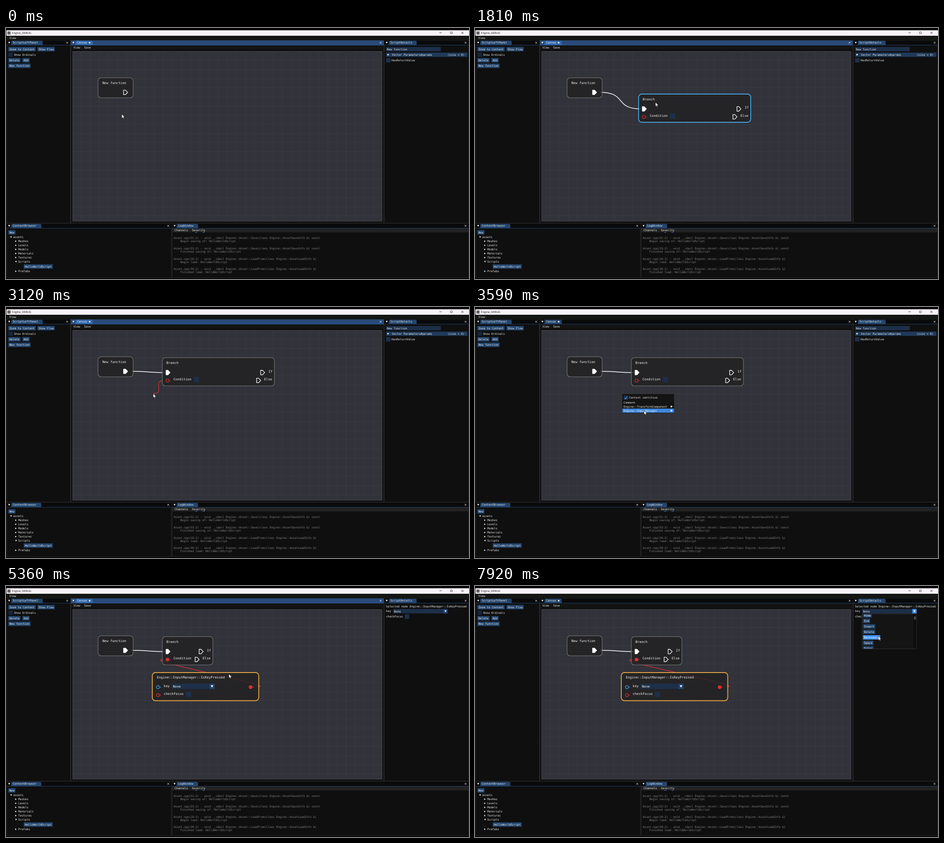
Animation of 1016x551 px, one loop 8 s. Source, as an HTML page:

```html
<!DOCTYPE html>
<html lang="en">
<head>
<meta charset="utf-8">
<title>Engine_DEBUG</title>
<style>
html, body { margin: 0; width: 100%; height: 100%; overflow: hidden; background: #000; }
svg { display: block; width: 100vw; height: 100vh; }
text { font-family: "DejaVu Sans Mono", "Liberation Mono", monospace; text-rendering: geometricPrecision; white-space: pre; }
.ui { font-family: "Open Sans", "Noto Sans", sans-serif; }
.bar { fill: #0a0a0a; }
.tab { fill: #23456d; }
.focus .bar { fill: #294a7a; }
.focus .tab { fill: #3368ad; }
</style>
</head>
<body>
<svg id="stage" viewBox="0 0 1016 551" xmlns="http://www.w3.org/2000/svg"></svg>
<script>
const LOOP = 8000;
const UI = 6.146, NODE = 7.29;            // font sizes: panels, graph nodes
const BTN = '#23456d', FRAME = '#1d2f49', HOT = '#4296fa', ROW = '#3d87e0';
const RED = '#dc3030', BLUE = '#45a3de', ORANGE = '#dfa043', GREY = '#7c7c7e';

// ---- drawing helpers (return SVG markup) ----
const rect = (x, y, w, h, fill, more = '') =>
  `<rect x="${x}" y="${y}" width="${w}" height="${h}" ${fill && `fill="${fill}"`} ${more}/>`;
const text = (x, mid, s, fill = '#f2f2f2', size = UI, more = '') =>
  `<text x="${x}" y="${mid + size * 0.35}" font-size="${size}" fill="${fill}" ${more}>${s.replace(/&/g, '&amp;')}</text>`;
const path = (d, fill, stroke = 'none', w = 1, more = '') =>
  `<path d="${d}" ${fill && `fill="${fill}"`} stroke="${stroke}" stroke-width="${w}" ${more}/>`;
const group = (id, inner, more = '') => `<g id="${id}" ${more}>${inner}</g>`;
const down = (x, y, r = 2.2) => path(`M${x - r},${y - r * .8}h${2 * r}l${-r},${r * 1.7}z`, '#fff');
const right = (x, y, r = 2) => path(`M${x - r * .8},${y - r}v${2 * r}l${r * 1.8},${-r}z`, '#fff');
const cross = (x, y, c = '#eee', r = 1.9) =>
  path(`M${x - r},${y - r}l${2 * r},${2 * r}m0,${-2 * r}l${-2 * r},${2 * r}`, 'none', c, .9);
const button = (x, y, s) =>
  rect(x, y, s.length * 3.7 + 4.6, 9.6, BTN) + text(x + 2.4, y + 4.9, s);
const flow = (x, y, id, fill = 'none') =>
  path(`M${x},${y - 4.9}h4.2l4.7,4.9l-4.7,4.9h-4.2z`, fill, '#fff', 1.3, `id="${id}" stroke-linejoin="round"`);
const pin = (x, y, c, id = '') =>
  `<circle ${id && `id="${id}"`} cx="${x}" cy="${y}" r="3.3" fill="none" stroke="${c}" stroke-width="1.3"/>` +
  path(`M${x + 4.8},${y - 1.6}v3.2l2.2,-1.6z`, c);
const nodeBox = (id, w, h) =>
  rect(0, 0, w, h, 'rgba(32,32,32,.78)', `id="${id}" rx="7" stroke="${GREY}" stroke-width="1.1"`);

const panel = (x, y, w, h, name, tabW) => group('win' + name,
  rect(x, y, w, h, '#0f0f0f', 'stroke="#37373c" stroke-width=".8"') +
  rect(x, y, w, 10, '', 'class="bar"') + rect(x, y + 9.7, w, .9, '', 'class="tab"') +
  path(`M${x + 10},${y + 10}v-7q0,-2.4 2.4,-2.4h${tabW - 4.8}q2.4,0 2.4,2.4v7z`, '', 'none', 0, 'class="tab"') +
  down(x + 5.5, y + 4.9) + text(x + 13.5, y + 5, name) + cross(x + w - 7, y + 5));

function grid() {
  let d = '';
  for (let x = 164.5; x < 825; x += 20.07) d += `M${x},51.5V424`;
  for (let y = 71; y < 424; y += 20.07) d += `M146.5,${y}H825`;
  return rect(146.5, 51.5, 678.5, 372.5, '#32323a', 'stroke="#4c4c54" stroke-width="1"') + path(d, 'none', '#3d3d44', .8);
}

function tree() {
  const names = ['Meshes', 'Levels', 'Models', 'Materials', 'Textures', 'Scripts'];
  return down(11.2, 459, 1.9) + text(16, 459, 'assets') +
    names.map((n, i) => {
      const y = 468 + 9 * i;
      return (n === 'Scripts' ? down(22, y, 1.9) : right(21.6, y, 1.8)) + text(27, y, n);
    }).join('') +
    button(38.8, 518.8, 'HelloWorldScript') + right(21.6, 534, 1.8) + text(27, 534, 'Prefabs');
}

function log() {
  const save = 'Save(class Engine::AssetSaveInfo &) const', load = 'LoadFrom(class Engine::AssetLoadInfo &)';
  return [['51:2', save, 'Begin saving of'], ['53:2', save, 'Finished saving of'],
          ['19:2', load, 'Begin load'], ['39:2', load, 'Finished load']].map(([at, fn, msg], i) => {
    const y = 461 + 22.7 * i;
    return text(368, y, `Asset.cpp(${at}) - void __cdecl Engine::Asset::${fn}`, '#858585') +
      text(382.6, y + 7, `${msg}: HelloWorldScript`, '#858585');
  }).join('');
}

const windowFrame =
  rect(1, 5, 1015, 12, '#faf3fa') + rect(3, 7.5, 7, 7, '#666') +
  text(13, 11, 'Engine_DEBUG', '#111', 6.1, 'class="ui"') +
  path('M951,10.5h5', 'none', '#222', .8) +
  rect(975.3, 8.6, 4, 4, 'none', 'stroke="#222" stroke-width=".8" rx=".6"') + cross(1001.6, 10.6, '#222', 2.3) +
  rect(1, 17, 1015, 10, '#141614') + text(7.5, 22, 'View');

const leftPanel = panel(1.5, 27.3, 139.8, 401, 'ScriptLeftPanel', 69) +
  button(5, 41.6, 'Zoom to Content') + button(69, 41.6, 'Show Flow') +
  rect(5.2, 53.6, 9.8, 9.8, '#16263c') + text(17.4, 58.7, 'Show Ordinals') +
  button(5, 66, 'Delete') + button(36, 66, 'Add') + button(5, 78.2, 'New function');

const canvas = panel(142.4, 27.3, 686.6, 401, 'Canvas', 38) +
  '<circle cx="183.6" cy="32.2" r="1.7" fill="#fff"/>' +
  rect(142.8, 38, 686, 9.4, '#141414') + text(148, 42.4, 'View') + text(171.5, 42.4, 'Save') + grid();

const browser = panel(1.5, 429.3, 361.5, 119, 'ContentBrowser', 66) + button(5, 443.8, 'New') + tree();
const logPanel = panel(364.4, 429.3, 651, 119, 'LogWindow', 47) +
  rect(364.8, 440, 650.4, 8.6, '#222') + text(370, 444.3, 'Channels') + text(408, 444.3, 'Severity') +
  path('M415,448.7h5M431,448.7h5', 'none', '#3d78c4', 1) + log();

const combo = (x, y, w, h, id) =>
  rect(x, y, w, h, FRAME) + rect(x + w - h + .5, y, h - .5, h, BTN, `id="${id}"`) + down(x + w - h / 2 + .3, y + h / 2, 2.4);

const details = panel(830, 27.3, 185.5, 401, 'ScriptDetails', 61) +
  group('fnInfo', rect(834, 41.6, 120, 9.6, FRAME) + text(836, 46.5, 'New function') +
    rect(834, 54, 178.5, 9.4, '#1f3958') + right(838.8, 58.6, 2.2) +
    text(846.8, 58.7, 'Vector Paramaters#params') + text(969, 58.7, '(size = 0)') +
    rect(834, 66, 9.8, 9.8, FRAME) + text(846, 71, 'HasReturnValue')) +
  group('nodeInfo', text(834, 45, 'Selected node Engine::InputManager::IsKeyPressed') +
    text(834, 54.6, 'key') + combo(849.2, 50.4, 119.8, 9.8, 'infoArrow') + text(851.6, 55.5, 'None') +
    text(834, 66.4, 'checkFocus') + rect(875, 62.4, 9.8, 9.8, FRAME));

const startNode = group('start', nodeBox('startBox', 77, 44) +
  text(9.4, 11, 'New function', '#f2f2f2', NODE) + flow(56, 32, 'startPin'), 'transform="translate(202 109.3)"');

const branchNode = group('branch', nodeBox('branchBox', 246, 62) +
  text(9, 11.6, 'Branch', '#f2f2f2', NODE) + flow(8.2, 32.6, 'inPin', '#fff') +
  pin(11.4, 50.2, '#c93030', 'condPin') + text(24.4, 47.3, 'Condition', '#f2f2f2', NODE) +
  rect(68.6, 42.4, 11.8, 11.8, FRAME, 'id="condBox"') +
  group('outs', flow(215.8, 32.6, 'ifPin') + text(233, 29.8, 'If', '#f2f2f2', NODE) +
    flow(207, 50, 'elsePin') + text(223.4, 47.1, 'Else', '#f2f2f2', NODE)));

const keyNode = group('keyNode', nodeBox('keyBox', 233.6, 61.8) +
  text(10, 10.9, 'Engine::InputManager::IsKeyPressed', '#f2f2f2', NODE) +
  combo(42.6, 24.5, 94.2, 11.6, 'keyArrow') +
  rect(5, 25, 168, 14, 'rgba(60,180,255,.38)', 'id="keyRow" rx="1"') +
  down(130.9, 30.2, 2.6) + text(45.2, 30.6, 'None', '#f2f2f2', NODE) +
  pin(12.4, 32, '#3a9fe0') + text(25, 29.4, 'key', '#f2f2f2', NODE) +
  pin(12.4, 49.4, RED) + text(25, 46.7, 'checkFocus', '#f2f2f2', NODE) + rect(73.6, 41.6, 11.8, 11.8, FRAME) +
  `<circle cx="215.8" cy="32" r="3.9" fill="${RED}"/>` + path('M220.6,30.4v3.2l2.2,-1.6z', RED),
  'transform="translate(321 190)"');

// Context menu; rows ending in ">" open a submenu
function menu(id, x, y, rows, w = 114.6) {
  const h = 16 + rows.length * 9;
  return group(id, rect(0, 0, w, h, '#141414', 'stroke="#3a3a42" stroke-width=".9"') +
    rect(3.4, 3.6, 9.8, 9.8, FRAME) + path('M5.4,8.6l2.2,2.4l3.8,-4.8', 'none', HOT, 1.5) + text(15.2, 8.6, 'Context sentitive') +
    rect(.8, 0, w - 1.6, 9, ROW, `id="${id}Row"`) +
    rows.map((r, i) => text(3.2, 19.1 + 9 * i, r.replace('>', '')) +
      (r.endsWith('>') ? right(108.6, 18.9 + 9 * i, 2.4) : '')).join(''), `transform="translate(${x} ${y})"`);
}
const subRows = ['IsKeyDown', 'IsKeyPressed', 'IsKeyReleased', 'IsMouseDown'];
const menus =
  menu('menuA', 359, 145, ['Branch', 'Comment', 'Sequence', 'While', 'Engine::TransformComponent>', 'Engine::InputManager>', 'Engine::Transform>']) +
  menu('menuB', 322.8, 190.6, ['Comment', 'Engine::TransformComponent>', 'Engine::InputManager>']) +
  group('sub', rect(0, 0, 67, 41, '#141414', 'stroke="#3a3a42" stroke-width=".9"') +
    rect(.8, 2.6, 65.4, 9, ROW, 'id="subRow"') +
    subRows.map((r, i) => text(3.2, 7.1 + 9 * i, r)).join(''), 'transform="translate(437.4 220.5)"');

// Key list of the drop-down
const keys = ['None', 'Tab', 'LeftArrow', 'RightArrow', 'UpArrow', 'DownArrow', 'PageUp', 'PageDown', 'Home', 'End',
  'Insert', 'Delete', 'Backspace', 'Space', 'Enter', 'Escape', 'Quote'];
const STEP = 12.1, SCROLL = 33.2;
const list = group('list', rect(849.6, 61, 119.4, 77, '#141414', 'stroke="#3a3a42" stroke-width=".9"') +
  '<clipPath id="clip"><rect x="850" y="61.4" width="118.4" height="76.2"/></clipPath>' +
  `<g clip-path="url(#clip)">` + group('items', keys.map((k, i) =>
    `<g class="key">${button(851.4, 62.4 + STEP * i, k)}</g>`).join('')) + '</g>' +
  rect(962.4, 61.5, 6, 76, '#0d0d0d') + rect(963.4, 62.5, 4, 7.4, '#4f4f4f', 'id="thumb" rx="2"'));

const pointer = group('pointer', '<circle id="press" cx="0" cy="1" r="6.4" fill="#b4ab16" fill-opacity=".9"/>' +
  path('M0,0V9.2L2.1,7.3L3.6,10.6L5,10L3.6,6.8H6.4Z', '#fff', '#000', .6));

stage.innerHTML = windowFrame + leftPanel + canvas + details + browser + logPanel +
  path('', 'none', '#fff', 1.5, 'id="flowLink"') + path('', 'none', RED, 1.3, 'id="boolLink"') +
  startNode + branchNode + keyNode + menus + list + pointer;

// ---- timeline ----
const moves = [ // time, x, y of the pointer tip
  [70, 254, 189], [340, 262, 141], [420, 262, 141], [840, 359, 145], [900, 359, 145], [1470, 396, 163],
  [1950, 396, 163], [2090, 424, 162], [2150, 424, 162], [2400, 408, 127.5], [2480, 408, 127.5], [2700, 354, 161],
  [2800, 354, 161], [3080, 323, 190], [3150, 323, 190], [3520, 371, 227], [3590, 371, 227], [3660, 372, 227],
  [3860, 372, 227], [4060, 456, 226.5], [4560, 456, 226.5], [4950, 468, 200], [5270, 468, 200], [5960, 912.5, 53],
  [6630, 912.5, 53], [6840, 905, 160], [6950, 905, 160], [7370, 894, 110], [7510, 894, 110], [7730, 885, 110]
];
const PICK = 6200, OPEN = 6400;           // press on the drop-down, list opens
const presses = [[400, 870], [1600, 1690], [2120, 2470], [2770, 3120], [4330, 4420], [5110, 5230], [PICK, 6360]];
const wheel = [7080, 7260, 7920];
const BRANCH = 1690, KEY = 4420, SELECT = 5230;

const within = (t, a, b) => t >= a && t < b;
const el = id => document.getElementById(id);
const set = (id, k, v) => el(id).setAttribute(k, v);
const show = (id, on) => set(id, 'display', on ? 'inline' : 'none');
const focus = (name, on) => el('win' + name).classList.toggle('focus', on);

function tip(t) {
  let a = moves[0];
  for (const b of moves) {
    if (t < b[0]) {
      if (a === b) break;
      const u = (t - a[0]) / (b[0] - a[0]), e = u * u * (3 - 2 * u);
      return [a[1] + (b[1] - a[1]) * e, a[2] + (b[2] - a[2]) * e];
    }
    a = b;
  }
  return [a[1], a[2]];
}

// Bezier that leaves (x1,y1) in direction s and arrives at (x2,y2); short links bend less
function curve(x1, y1, x2, y2, s = 1) {
  const pull = 63, half = Math.hypot(x2 - x1, y2 - y1) / 2;
  const c = s * pull * Math.sin(Math.PI / 2 * Math.min(1, half / pull));
  return `M${x1},${y1}C${x1 + c},${y1} ${x2 - c},${y2} ${x2},${y2}`;
}

function border(id, color) {
  set(id, 'stroke', color);
  set(id, 'stroke-width', color === GREY ? 1.1 : 1.9);
}

function draw(t) {
  const [x, y] = tip(t);
  const over = (l, top, w, h) => x >= l && x <= l + w && y >= top && y <= top + h;
  const hasBranch = t >= BRANCH, hasKey = t >= KEY, selected = t >= SELECT;
  const menuA = within(t, 900, BRANCH), menuB = within(t, 3150, KEY), popup = menuA || menuB;

  set('pointer', 'transform', `translate(${x} ${y})`);
  show('press', presses.some(([a, b]) => within(t, a, b)));
  focus('Canvas', !popup && t < PICK);
  focus('ScriptDetails', within(t, PICK, OPEN));

  // Branch node, moved while held
  let bx = 359, by = 145;
  if (t >= 2400) { bx = 343; by = 111.3; }
  else if (t >= 2120) { bx = x - 65; by = y - 16.6; }
  const bw = hasKey ? 111 : 246;
  show('branch', hasBranch);
  set('branch', 'transform', `translate(${bx} ${by})`);
  set('branchBox', 'width', bw);
  set('outs', 'transform', `translate(${hasKey ? -135 : 0} 0)`);
  show('condBox', !hasKey);
  set('condPin', 'fill', hasKey ? RED : 'none');
  border('branchBox', !popup && over(bx, by, bw, 62) ? BLUE : GREY);
  border('startBox', !popup && over(202, 109, 77, 44) ? BLUE : GREY);
  set('startPin', 'fill', hasBranch ? '#fff' : 'none');

  // Links
  set('flowLink', 'd', hasBranch ? curve(275, 141.2, bx + 5, by + 32.6) :
    menuA ? curve(275, 141.2, 359, 145) :
    within(t, 420, 900) ? curve(275, 141.2, x, y) : '');
  set('boolLink', 'd', hasKey ? curve(549.5, 221.7, 347, 161.5) :
    within(t, 2800, 3150) ? curve(347, 161.5, x, y, -1) : '');

  // Key node
  show('keyNode', hasKey);
  const onKey = over(321, 190, 234, 62);
  border('keyBox', selected ? ORANGE : onKey ? BLUE : GREY);
  show('keyRow', !selected && onKey && within(y, 215, 229));
  set('keyArrow', 'fill', over(446, 214, 12, 14) ? '#2f6fb5' : BTN);

  // Menus
  const hover = (id, top, count, on) => {
    const i = Math.floor((y - top - 14.4) / 9);
    show(id + 'Row', on && i >= 0 && i < count);
    set(id + 'Row', 'y', 14.4 + 9 * i);
  };
  show('menuA', menuA);
  hover('menuA', 145, 7, x < 474);
  show('menuB', menuB);
  hover('menuB', 190.6, 3, true);
  show('sub', within(t, 3660, KEY));
  show('subRow', x > 437);

  // Details and drop-down
  show('fnInfo', !selected);
  show('nodeInfo', selected);
  set('infoArrow', 'fill', over(849, 50, 120, 10) || t >= OPEN ? HOT : BTN);
  show('list', t >= OPEN);
  const scroll = SCROLL * wheel.filter(w => t >= w).length;
  set('items', 'transform', `translate(0 ${-scroll})`);
  set('thumb', 'y', 62.5 + scroll * .04);
  document.querySelectorAll('.key').forEach((g, i) => {
    const top = 62.4 + STEP * i - scroll;
    g.firstChild.setAttribute('fill', y > 61 && y < 138 && over(851.4, top, keys[i].length * 3.7 + 4.6, 9.6) ? HOT : BTN);
  });
}

const began = performance.now();
function tick() {
  draw((performance.now() - began) % LOOP);
  requestAnimationFrame(tick);
}
tick();
</script>
</body>
</html>
```
